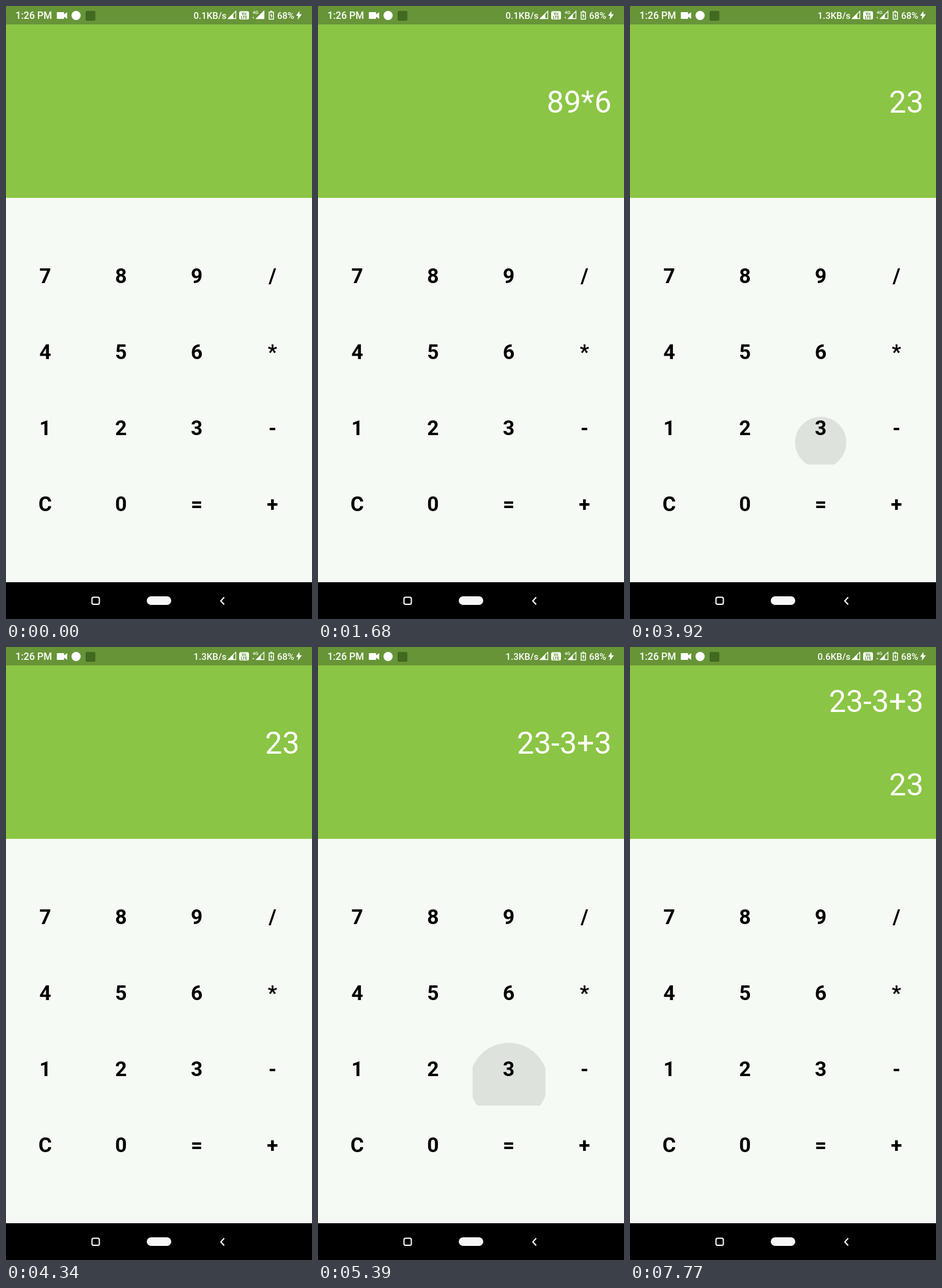
Recreate the animation shown at these times as an HTML page. Size 500x1000 px, loop 8 s.

```html
<!DOCTYPE html>
<html lang="en">
<head>
<meta charset="utf-8">
<title>Calculator</title>
<style>
  html, body { margin: 0; width: 100%; height: 100%; overflow: hidden; background: #f6faf4; }
  svg { display: block; width: 100vw; height: 100vh; font-family: Roboto, Arial, sans-serif; }
  .status { fill: #fff; font-weight: 500; font-size: 15px; }
  .display { fill: #fff; font-size: 50px; text-anchor: end; }
  .keys { fill: #000; font-weight: 700; font-size: 33.5px; text-anchor: middle; }
  .line { fill: none; stroke: #fff; }
</style>
</head>
<body>
<svg viewBox="0 0 500 1000" xmlns="http://www.w3.org/2000/svg">
  <defs>
    <clipPath id="keyClip"><rect id="keyBox" width="119" height="120"/></clipPath>
  </defs>
  <rect width="500" height="1000" fill="#f6faf4"/>
  <rect width="500" height="313" fill="#8bc545"/>
  <rect width="500" height="30" fill="#669437"/>

  <g class="status">
    <text x="15.5" y="21" font-size="16">1:26 PM</text>
    <path d="M84 10h10q1 0 1 1v2.5l5-3.500v11l-5-3.500v2.500q0 1-1 1h-10q-1 0-1-1v-9q0-1 1-1z"/>
    <circle cx="114.500" cy="15.500" r="7.500"/>
    <rect x="130" y="8" width="16" height="16" rx="2" fill="#42691f"/>
    <text id="speed" x="306.500" y="21"></text>
    <path class="line" d="M363.500 20.500L375.500 8.500V20.500z" stroke-width="1.300"/>
    <path d="M362 21L371.500 11.500V21z"/>
    <rect x="381" y="8.500" width="16" height="13.500" rx="2.500"/>
    <g fill="#669437" font-size="6.500" font-weight="700" text-anchor="middle">
      <text x="389" y="14.800">Vo</text><text x="389" y="20.700">LTE</text>
    </g>
    <text x="403" y="12.700" font-size="7.500">4G</text>
    <path d="M402.500 18h3l-1.500 3z" opacity=".8"/>
    <path class="line" d="M409.500 20.500L421.500 8.500V20.500z" stroke-width="1.300"/>
    <path id="signal"/>
    <path class="line" d="M430 10h7v11.500h-7zM432 8.500h3" stroke-width="1.500"/>
    <path d="M434 11.500l-2.500 4.500h1.500v4l2.500-4.500h-1.500z"/>
    <text x="443" y="21">68%</text>
    <path d="M479.500 8l-5.500 8h3.500l-1 6.500 7-9h-4z"/>
  </g>

  <g class="display">
    <text id="entry" x="479.500"></text>
    <text id="result" x="479.500" y="242"></text>
  </g>

  <g clip-path="url(#keyClip)"><circle id="ripple"/></g>
  <g id="keys" class="keys"></g>

  <rect y="940" width="500" height="60" fill="#000"/>
  <rect class="line" x="140.500" y="964.500" width="12" height="11.500" rx="2.500" stroke-width="2"/>
  <rect x="230" y="963" width="40" height="14" rx="7" fill="#f7f7f7"/>
  <path class="line" d="M356.500 964.500L351 970.500L356.500 976.500" stroke-width="2"/>
</svg>
<script>
const LOOP = 8000, STEP = 70, LAST_STEP = 111;
const LAYOUT = '789/456*123-C0=+';
const el = id => document.getElementById(id);

const keyCenter = key => {
  const i = LAYOUT.indexOf(key);
  return { x: 64 + (i % 4) * 123.8, y: 440 + Math.floor(i / 4) * 124 };
};

// step, key, touch offset from the key's centre
const TAPS = [
  [1, '8', 4, 14], [7, '9', 2, 16], [13, '*', -4, 14], [21, '6', 2, 16],
  [32, '=', 4, 10], [44, 'C', -22, 17], [49, '2', 4, 20], [56, '3', 0, 24],
  [63, '-', -4, 18], [67, '3', 0, 28], [72, '+', -6, 14], [76, '3', 0, 29],
  [83, '=', 5, 8], [92, '=', 6.5, 6]
];

// ripple stages: radius, travel towards the key's centre, strength
const STAGES = [[42, 0, 1], [64, 0.25, 1], [80, 0.55, 0.45]];

function evaluate(text) {
  return text.match(/[+-]?[\d*\/]+/g).reduce((sum, term) => {
    const parts = term.match(/[*\/]?[+-]?\d+/g);
    return sum + parts.reduce((n, p) =>
      p[0] === '*' ? n * p.slice(1) : p[0] === '/' ? n / p.slice(1) : +p, 0);
  }, 0);
}

function displayAt(step) {
  let entry = '', result = '';
  for (const [start, key] of TAPS) {
    if (start > step) break;
    if (key === 'C') entry = result = '';
    else if (key === '=') result = String(evaluate(entry));
    else entry += key;
  }
  return { entry, result };
}

function drawRipple(step) {
  const ripple = el('ripple');
  const tap = TAPS.find(([start]) => step >= start && step < start + STAGES.length);
  ripple.style.display = tap ? '' : 'none';
  if (!tap) return;
  const [start, key, dx, dy] = tap;
  const [radius, travel, strength] = STAGES[step - start];
  const { x, y } = keyCenter(key);
  el('keyBox').setAttribute('x', x - 59);
  el('keyBox').setAttribute('y', y - 60);
  ripple.setAttribute('cx', x + dx * (1 - travel));
  ripple.setAttribute('cy', y + 2 * (key === 'C' ? 0 : 0) + dy * (1 - travel));
  ripple.setAttribute('r', radius);
  ripple.setAttribute('fill', key === '=' ? '#d9efcc' : '#dee2dd');
  ripple.setAttribute('opacity', strength);
}

function render(time) {
  const step = Math.min(LAST_STEP, Math.floor((time % LOOP) / STEP));
  const { entry, result } = displayAt(step);
  el('entry').textContent = entry;
  el('entry').setAttribute('y', result ? 106 : 174);
  el('result').textContent = result;
  el('speed').textContent = (step < 52 ? '0.1' : step < 109 ? '1.3' : '0.6') + 'KB/s';
  el('signal').setAttribute('d', step < 13 ? 'M408 21L422 7V21z' : 'M408 21L416.500 12.500V21z');
  drawRipple(step);
}

el('keys').innerHTML = [...LAYOUT].map(key => {
  const { x, y } = keyCenter(key);
  return `<text x="${x}" y="${y + 12}">${key}</text>`;
}).join('');

const begin = performance.now();
function tick() {
  render(performance.now() - begin);
  requestAnimationFrame(tick);
}
tick();
</script>
</body>
</html>
```
